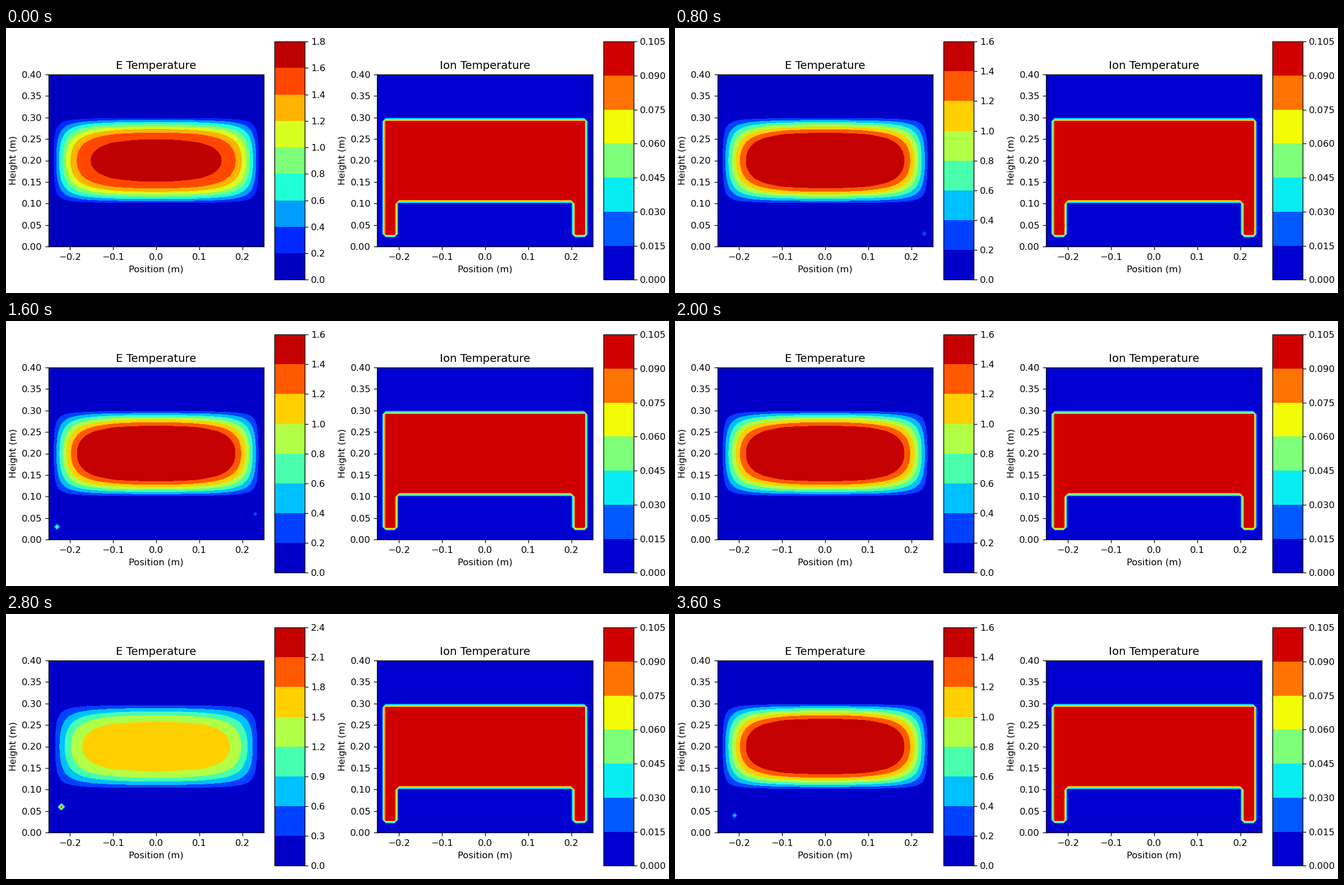
Animation, 1183 px wide and 473 px high, one loop 4600 ms. Source, as a matplotlib script:

```python
import numpy as np
import matplotlib.pyplot as plt
from matplotlib.animation import FuncAnimation

DPI = 118.25
W, H = 1183, 473
STEP_MS, LOOP_MS, HOLD_MS, STATES = 200, 4600, 400, 10

plt.rcParams.update({"font.family": "DejaVu Sans", "font.size": 10})
fig = plt.figure(figsize=(W / DPI + 1e-9, H / DPI), dpi=DPI, facecolor="white")

X, Y = np.meshgrid(np.arange(-25, 26) / 100, np.arange(41) / 100)
dist_x, dist_y = np.abs(X), np.abs(Y - 0.2)

block = (dist_x < 0.235) & (dist_y < 0.095)
legs = (dist_x > 0.205) & (dist_x < 0.235) & (Y > 0.025) & (Y < 0.2)
ion_temp = np.where(block | legs, 0.1, 0.0)


def electron_temp(slope, cap, sharpness):
    """Steady heat in a box, levelling off softly below the cap."""
    across = 1 - np.cosh(14 * dist_x) / np.cosh(14 * 0.243)
    upward = 1 - (dist_y / 0.1023) ** 2
    heat = slope / cap * across.clip(0) * upward.clip(0)
    return cap * heat / (1 + heat ** sharpness) ** (1 / sharpness)


# Short-lived hot cells in the legs: (x, y, temperature) for each state.
SPARKS = {
    1: [(-.21, .05, .8), (-.21, .03, .8), (.23, .06, 1.72)],
    2: [(.23, .03, .38)],
    4: [(-.23, .03, .8), (.23, .06, .33)],
    7: [(-.22, .06, 2.25)],
    9: [(-.21, .04, .57)],
}


def nice_levels(peak):
    step = next(s for s in (0.2, 0.25, 0.3) if peak / s < 8.5)
    return np.arange(np.ceil(peak / step) + 1) * step


def add_axes(left, top, width, height):
    return fig.add_axes([left / W, 1 - (top + height) / H, width / W, height / H])


def panel(title, temp, levels, left, width, bar_left):
    height = width * 0.8
    ax = add_axes(left, 236.5 - height / 2, width, height)
    filled = ax.contourf(X, Y, temp, levels=levels, cmap="jet")
    ax.set(title=title, xlabel="Position (m)", ylabel="Height (m)",
           xlim=(-0.25, 0.25), ylim=(0, 0.4))
    ax.set_xticks(np.arange(-2, 3) / 10)
    ax.set_yticks(np.arange(9) / 20)
    bar = fig.colorbar(filled, cax=add_axes(bar_left, 24, 53.3, 425.4))
    bar.set_ticks(levels)


def draw(frame):
    fig.clear()
    state = min(frame * STEP_MS // HOLD_MS, STATES - 1)
    temp = electron_temp(2.65, 1.72, 6) if state == 0 else electron_temp(2.55, 1.57, 12)
    for x, y, value in SPARKS.get(state, []):
        temp[round(y * 100), round(x * 100) + 25] = value
    levels = nice_levels(temp.max())

    # Two-decimal colour bar labels leave less room for the plots.
    shrink = 5 if np.isclose(levels[1], 0.25) else 0
    width = 384.6 - shrink
    panel("E Temperature", temp, levels, 75.6, width, 479.2 - shrink)
    panel("Ion Temperature", ion_temp, np.arange(8) * 0.015,
          1047 - width, width, 1066.4)
    return fig.axes


anim = FuncAnimation(fig, draw, frames=LOOP_MS // STEP_MS, interval=STEP_MS,
                     init_func=lambda: [], repeat=True, repeat_delay=0, blit=False)
plt.show()
```
